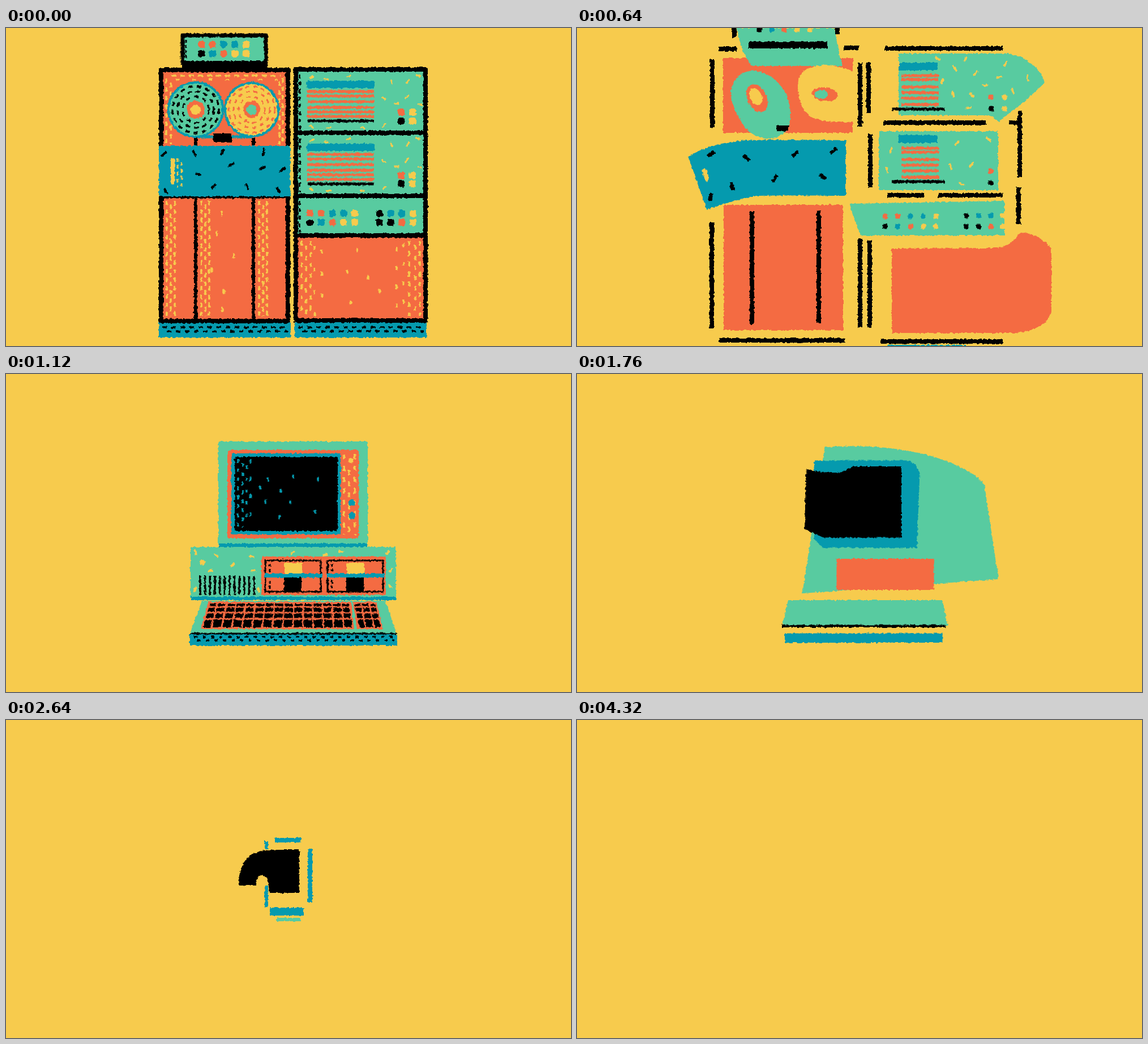
Write an HTML page that moves like this. It is 998 px wide and 561 px high and loops after 4.8 s.

```html
<!DOCTYPE html>
<html lang="en">
<head>
<meta charset="utf-8">
<title>Shrinking computers</title>
<style>
html, body { margin: 0; width: 100%; height: 100%; overflow: hidden; background: #f7cb4d; }
svg { display: block; width: 100vw; height: 100vh; }
</style>
</head>
<body>
<svg viewBox="0 0 998 561" preserveAspectRatio="none">
  <filter id="rough" filterUnits="userSpaceOnUse" x="0" y="0" width="998" height="561" color-interpolation-filters="sRGB">
    <feTurbulence id="noise" type="fractalNoise" baseFrequency=".22" numOctaves="2" seed="3"/>
    <feDisplacementMap in="SourceGraphic" scale="5" xChannelSelector="R" yChannelSelector="G"/>
  </filter>
  <g id="art" filter="url(#rough)"></g>
</svg>
<script>
const LOOP = 4800, STEP = 80;
const Y = '#f7cb4d', O = '#f46b42', G = '#58cba0', B = '#059aae', K = '#000';
const ink = { Y, O, G, B, K };
const NUM = /-?\d+(\.\d+)?/g;
const lerp = (a, b, u) => a + (b - a) * u;

// Basic marks
const rect = (x1, y1, x2, y2, c, r = 1) =>
  `<rect x="${x1}" y="${y1}" width="${x2 - x1}" height="${y2 - y1}" rx="${r}" fill="${c}"/>`;
const frame = (x1, y1, x2, y2, c, w) =>
  `<path d="${box(x1, y1, x2, y2)}" fill="${c}" stroke="#000" stroke-width="${w}" stroke-linejoin="round"/>`;
const line = (x1, y1, x2, y2, c, w, gaps = '') =>
  `<path d="M${x1} ${y1}L${x2} ${y2}" stroke="${c}" stroke-width="${w}" stroke-dasharray="${gaps}"/>`;
const disc = (x, y, r, c) => `<circle cx="${x}" cy="${y}" r="${r}" fill="${c}"/>`;
const ring = (x, y, r, c, w, gaps = '') =>
  `<circle cx="${x}" cy="${y}" r="${r}" fill="none" stroke="${c}" stroke-width="${w}" stroke-dasharray="${gaps}"/>`;
const shape = (d, c) => `<path d="${d}" fill="${c}"/>`;
const rep = (n, f) => Array.from({ length: n }, (_, i) => f(i)).join('');
const dots = (x, y, colors, gap = 19.7, s = 12) => [...colors].map((c, i) =>
  rect(x + i * gap - s / 2, y - s / 2, x + i * gap + s / 2, y + s / 2, ink[c], s / 3)).join('');
// Short strokes from a flat list of x, y, angle
const marks = (list, c, len = 9, w = 3.5) => rep(list.length / 3, i => {
  const [x, y, a] = list.slice(i * 3, i * 3 + 3);
  return `<rect x="${-len / 2}" y="${-w / 2}" width="${len}" height="${w}" rx="1" fill="${c}" transform="translate(${x} ${y}) rotate(${a})"/>`;
});
const cols = (xs, y1, y2, c, w = 3.5, gaps = '8 7') =>
  xs.map((x, i) => line(x, y1 + i % 2 * 7, x, y2, c, w, gaps)).join('');

// Outlines
const box = (x1, y1, x2, y2) => `M${x1} ${y1}L${x2} ${y1}L${x2} ${y2}L${x1} ${y2}Z`;
const bar = (x1, y1, x2, y2, w) => x1 === x2
  ? box(x1 - w / 2, y1, x1 + w / 2, y2) : box(x1, y1 - w / 2, x2, y1 + w / 2);
const oval = (x, y, rx, ry, deg) => {
  const t = deg * Math.PI / 180;
  return 'M' + Array.from({ length: 24 }, (_, i) => {
    const a = i * Math.PI / 12, p = rx * Math.cos(a), q = ry * Math.sin(a);
    return (x + p * Math.cos(t) - q * Math.sin(t)).toFixed(1) + ' ' + (y + p * Math.sin(t) + q * Math.cos(t)).toFixed(1);
  }).join('L') + 'Z';
};

// A key is an outline, or [x, y] where the piece collapses to a point
function mix(a, b, u) {
  const to = Array.isArray(b) ? null : b.match(NUM);
  let i = 0;
  return a.replace(NUM, v => {
    const end = to ? +to[i] : b[i % 2];
    i++;
    return lerp(+v, end, u).toFixed(1);
  });
}
function morph(pieces, times, t) {
  let i = 0;
  while (i < times.length - 2 && times[i + 1] <= t) i++;
  const u = (t - times[i]) / (times[i + 1] - times[i]);
  return pieces.map(([c, ...keys]) => {
    const a = keys[i], b = keys[i + 1];
    if (!a || (u && !b)) return '';
    return shape(u ? mix(a, b, u) : a, c);
  }).join('');
}

function terminal(dy) {
  return rect(531, 93 + dy, 651, 106 + dy, B, 4) +
    [112, 120, 130, 140, 148, 156].map(y => line(532, y + dy, 650, y + dy, O, 5)).join('') +
    line(533, 164 + dy, 650, 164 + dy, K, 5) +
    dots(698, 149 + dy, 'OY', 20) + dots(698, 164 + dy, 'KY', 20) +
    marks([540,87,-30, 566,90,10, 605,85,-20, 681,95,65, 710,94,-60, 728,84,20, 667,124,30, 708,122,-40, 690,133,0,
      731,135,20, 668,171,-50, 570,176,-15, 630,176,10, 540,174,40].map((v, i) => i % 3 === 1 ? v + dy : v), Y, 9, 3);
}

function mainframe() {
  const base = x => rect(x, 519, x + 233, 546, B) +
    line(x + 6, 528, x + 228, 528, K, 3.5, '8 8') + line(x + 14, 535, x + 228, 535, K, 3.5, '8 8');
  return base(270) + base(510) +
    frame(312, 13, 459, 62, G, 7) + rect(310, 58, 462, 72, K) +
    dots(345, 29, 'OOBBY') + dots(345, 45, 'KBOYY') + line(318, 21, 318, 55, K, 3, '5 4') +
    frame(274, 74, 498, 517, O, 8) +
    line(291, 84, 484, 84, Y, 3.5, '9 7') + line(300, 91, 480, 91, Y, 3, '7 22') +
    cols([283, 291], 90, 205, Y) + cols([489, 483], 88, 205, Y) +
    line(335, 192, 434, 192, B, 5) +
    line(335, 194, 335, 516, K, 6) + line(437, 194, 437, 516, K, 6) +
    disc(335, 144, 47, G) + ring(335, 144, 48, B, 4) +
    [23, 32, 41].map(r => ring(335, 144, r, K, 3.5, '8 7')).join('') +
    disc(335, 144, 16, O) + disc(335, 144, 9, Y) +
    disc(434, 144, 47, Y) + ring(434, 144, 47, B, 4) +
    [23, 32, 41].map(r => ring(434, 144, r, O, 3, '7 7')).join('') +
    disc(434, 144, 15, O) + disc(434, 144, 9, G) +
    rect(366, 186, 399, 202, K, 2) +
    line(272, 298, 500, 298, K, 5) + rect(270, 208, 502, 297, B) +
    marks([279,222,-45, 333,221,55, 382,219,-65, 455,219,-85, 398,241,-25, 453,247,-25, 488,250,-35,
      339,258,20, 367,279,-45, 426,280,65, 481,286,60, 282,288,55], K, 12, 4) +
    rect(291, 229, 298, 276, Y, 3) + cols([303, 310], 230, 281, Y, 3, '6 6') +
    cols([284, 291, 298], 305, 508, Y) + cols([345, 352, 359], 305, 508, Y) + cols([447, 454, 461], 305, 508, Y) +
    marks([381,327,90, 372,363,90, 402,401,90, 363,427,90, 385,465,90, 382,497,90], Y) +
    frame(512, 73, 741, 366, G, 8) + frame(512, 366, 741, 516, O, 8) +
    line(510, 185, 743, 185, K, 8) + line(510, 296, 743, 296, K, 8) +
    [[82, 180], [195, 290], [305, 360]].map(([a, b]) => line(519, a, 519, b, K, 3.5, '7 6')).join('') +
    terminal(0) + terminal(111) +
    dots(537, 327, 'OOBBY') + dots(537, 343, 'KBOYY') + dots(660, 327, 'KBBY') + dots(660, 343, 'KKOY') +
    cols([522, 530, 538], 376, 508, Y, 3.5, '8 11') + cols([545, 558], 384, 508, Y, 3, '7 32') +
    cols([731, 723, 712], 376, 508, Y, 3.5, '8 10') + cols([702, 690], 380, 508, Y, 3, '7 26') +
    marks([603,430,90, 640,440,90, 620,391,90, 660,464,90, 609,484,90], Y, 7);
}

function desktop() {
  const drive = x => frame(x, 329, x + 98, 384, O, 3) +
    cols([x + 8], 335, 350, K, 3, '5 4') + cols([x + 8], 364, 379, K, 3, '5 4') +
    rect(x + 34, 333, x + 65, 354, Y) + rect(x + 33, 357, x + 64, 383, K) + rect(x - 2, 352, x + 101, 359, B);
  const keys = (a, b, c, d, n) => shape(`M${a} 402L${b} 402L${d} 450L${c} 450Z`, O) +
    shape(`M${a + 3} 405L${b - 3} 405L${d - 4} 447L${c + 4} 447Z`, K) +
    rep(n - 1, i => line(lerp(a, b, (i + 1) / n), 403, lerp(c, d, (i + 1) / n), 449, O, 3)) +
    [411, 421, 432].map(y => line(lerp(a, c, (y - 402) / 48), y, lerp(b, d, (y - 402) / 48), y, O, 3)).join('');
  return rect(375, 119, 639, 302, G, 3) + rect(376, 299, 638, 306, B) +
    rect(391, 134, 623, 290, O, 3) + rect(398, 140, 591, 283, B, 2) + rect(404, 146, 586, 277, K, 3) +
    cols([410, 418], 150, 270, B, 3.5, '7 9') + cols([425], 162, 262, B, 3, '6 15') + cols([432], 150, 264, B, 3, '8 23') +
    marks([463,186,90, 507,181,90, 551,186,90, 449,200,90, 485,206,90, 458,225,90, 502,226,90, 546,243,90, 483,252,90], B, 7, 3.5) +
    cols([597, 606, 616], 142, 284, Y, 3.5, '9 11') +
    disc(609, 153, 7, O) + disc(609, 153, 5, Y) + disc(611, 227, 6, B) + disc(611, 250, 6, B) +
    rect(326, 305, 689, 395, G) + rect(327, 393, 689, 399, B) + disc(347, 332, 5, Y) +
    marks([371,320,25, 400,337,-35, 361,347,-10, 434,322,20, 436,347,-15, 334,380,-60, 335,315,80, 446,381,70,
      506,315,-35, 564,319,-20, 592,313,10, 674,315,-40, 680,346,-60, 678,374,55], Y, 9, 4) +
    rep(12, i => line(343 + i * 8.65, 356, 343 + i * 8.65, 390, K, 3.5)) +
    rect(451, 322, 671, 390, O, 3) + drive(458) + drive(568) +
    shape('M346 400L670 400L690 458L325 458Z', G) + keys(357, 609, 344, 615, 15) + keys(613, 655, 620, 666, 3) +
    rect(324, 459, 691, 479, B) + line(325, 458, 690, 458, K, 3) +
    line(332, 464, 686, 464, K, 3.5, '6 9') + line(338, 470, 686, 470, K, 3.5, '6 9');
}

const phone = () => rect(453, 340, 547, 358, G, 6) + rect(453, 201, 547, 350, B, 8) + rect(463, 214, 537, 326, K, 3) +
  cols([470, 477], 220, 320, B, 3, '6 9') +
  marks([500,238,90, 520,256,90, 495,275,90, 523,297,90], B, 6, 3) + disc(500, 338, 5, O);

const MELT = [640, 880, 1120];
const meltPieces = [
  [O, box(258, 53, 487, 185), 'M316 70L384 145L340 158L317 162Z', [391, 200]],
  [G, 'M283 0L455 0C458 20 462 40 464 50C466 58 469 62 470 67L390 67L310 67C296 55 285 20 283 0Z',
    'M295 32L462 32C480 70 520 85 570 122C600 145 632 160 632 177L570 208L445 208C430 200 400 160 384 147C335 105 312 75 295 32Z',
    'M375 119L560 119C600 119 639 119 639 150C639 200 639 280 639 302L500 302L375 302C375 250 375 200 375 119Z'],
  [G, 'M568 45L760 45C790 48 812 68 820 82C824 88 825 93 826 97L790 130L745 165L738 160C736 158 732 155 725 154L568 154Z',
    'M681 47L750 47C805 52 833 105 833 165C833 235 790 275 735 276L634 276L634 179L733 180C740 172 740 152 728 150L681 150Z',
    'M326 305L660 305C675 305 689 305 689 320C689 350 689 390 680 394L600 394L500 394L400 394C380 394 340 394 326 394L326 340Z'],
  [G, box(533, 182, 744, 286), box(634, 181, 736, 275)],
  [G, 'M272 110C278 75 315 65 345 88C365 102 376 125 377 150C377 170 372 185 358 190L350 194C325 200 300 185 290 165C278 145 270 125 272 110Z',
    'M328 165C335 140 370 130 385 152C410 185 430 215 470 235C490 244 515 245 533 247L533 253C490 256 450 248 430 235C390 215 345 195 328 165Z', [440, 280]],
  [O, oval(318, 124, 17, 26, -25), oval(375, 181, 8, 36, -45), [410, 220]],
  [Y, oval(316, 121, 10, 16, -25), oval(363, 169, 3.5, 6, -40)],
  [K, box(352, 172, 374, 182), box(571, 180, 634, 276), box(404, 146, 586, 277)],
  [Y, 'M390 100C392 75 410 64 445 66C465 68 480 72 492 80L492 164C470 168 440 166 420 160C400 152 390 130 390 100Z',
    'M451 115C455 92 490 90 525 118C560 140 590 165 606 188L603 199C580 185 545 175 500 155C470 140 448 135 451 115Z', [600, 200]],
  [O, oval(438, 117, 23, 12, 5), oval(498, 128, 34, 8, 22), [607, 200]],
  [G, oval(431, 117, 12, 8, 0), oval(484, 124, 7, 5, 10)],
  [O, box(259, 312, 470, 533), box(320, 327, 432, 474), 'M357 402L655 402L666 450L344 450Z'],
  [O, 'M556 389L742 388C765 385 775 372 783 360C808 362 828 375 838 390L838 500C835 522 800 538 770 538L640 538L580 538L556 538Z',
    'M491 321L785 321C792 321 798 321 802 323C820 328 834 338 834 350L834 487C828 500 810 515 795 515L690 515L690 404L491 404Z',
    'M452 322L620 322C640 322 655 322 660 322C668 322 671 324 671 328L671 380C671 386 668 390 660 390L560 390L500 390L452 390Z'],
  [G, 'M482 310L755 305L755 325L755 340L755 355L755 366L640 366L502 366C495 352 486 330 482 310Z',
    'M500 299L603 299L603 321L491 321L491 348L560 348L560 396L430 397C400 385 400 318 430 313Z',
    'M326 305L452 305L452 325L452 340L452 350L452 360L452 394L326 394C326 370 326 340 326 320Z'],
  [B, 'M475 198C400 197 340 197 300 198C260 200 215 212 197 228L229 320C255 312 290 300 320 296C370 295 430 296 475 296Z',
    'M312 195C210 205 146 260 146 335C146 410 210 470 320 475L320 413C265 410 227 395 227 352C227 320 270 297 312 291Z',
    'M324 460C324 465 324 470 324 478C400 478 500 478 691 478L691 460C600 460 550 460 500 460C450 460 400 460 340 460Z'],
  [G, box(228, 319, 230, 321), box(320, 414, 415, 474), 'M340 400L675 400L690 458L325 458Z'],
  [B, box(548, 559, 688, 580), box(636, 549, 678, 561)],
  [B, box(270, 570, 460, 590), box(364, 549, 400, 561)],
  [O, box(372, 180, 380, 184), box(386, 220, 393, 228)],
  [O, box(573, 261, 640, 266), box(505, 289, 522, 295)],
  [Y, oval(227, 259, 4.5, 12, -15), [240, 290]]
];
// Black bars: start x1 y1 x2 y2, end x1 y1 x2 y2
const keptBars = [
  [303,30,442,30, 368,34,383,34], [544,36,752,36, 632,37,650,37], [239,55,239,176, 247,87,247,93],
  [541,167,722,167, 655,165,675,165], [547,295,613,295, 575,289,581,289], [638,295,753,295, 690,292,697,292],
  [238,343,238,530, 246,380,246,386], [309,324,309,523, 315,411,315,426], [427,322,427,520, 435,437,487,437],
  [500,371,500,528, 500,419,500,433], [517,375,517,528, 519,427,519,434], [251,551,363,551, 310,539,318,539],
  [361,551,473,551, 411,539,419,539], [537,553,645,553, 590,540,598,540], [643,553,752,553, 689,540,697,540]
].map(b => [K, bar(...b.slice(0, 4), b[1] === 30 ? 12 : 8), bar(...b.slice(4), 7), [(b[4] + b[6]) / 2, (b[5] + b[7]) / 2]]);
const fading = (c, w, list) => list.map(b => [c, bar(...b, w), [(b[0] + b[2]) / 2, (b[1] + b[3]) / 2]]);
const lostBars = fading(K, 8, [
  [278,-20,278,17], [460,-20,460,11], [250,37,282,37], [471,35,498,35], [500,62,500,174], [515,61,515,150],
  [763,167,785,167], [782,146,782,263], [518,187,518,281], [780,281,780,346]]);
const panelBars = [0, 128].flatMap(dy => [
  ...fading(B, 14, [[568, 68 + dy, 637, 68 + dy]]),
  ...fading(O, 5, [84, 91, 104, 114, 124, 135].map(y => [573, y + dy, 639, y + dy])),
  ...fading(K, 5, [[556, 143 + dy, 650, 143 + dy]])]);

const bandMarks = [
  [237,222,-35, 299,229,40, 385,222,-35, 453,217,-40, 274,279,80, 349,266,-60, 434,262,35, 236,298,-75, 274,279,80, 236,298,-75, 237,222,-35],
  [224,244,-5, 272,222,30, 280,263,-85, 300,286,-55, 228,290,75, 214,338,-45, 258,431,-15, 196,410,85, 172,366,25, 299,456,-70, 178,290,-40]];
const archMarks = [
  [637,54,30, 667,71,60, 686,55,-60, 645,94,-70, 704,80,-45, 721,101,0, 757,63,-60, 745,87,-15, 796,88,80, 664,117,80, 770,112,75,
    692,141,-5, 671,203,-50, 660,244,70, 697,241,-45, 547,250,75, 727,196,30, 680,275,20, 555,215,-70, 697,118,45],
  [714,70,-75, 743,72,-65, 770,95,0, 701,121,90, 742,117,0, 752,150,80, 802,93,50, 800,121,15, 796,149,-45, 786,184,0, 799,217,-60,
    751,202,0, 678,201,-45, 730,229,-30, 754,243,-70, 663,245,80, 710,262,0, 710,262,0, 663,245,80, 742,117,0]];
const mixList = ([a, b], u) => a.map((v, i) => lerp(v, b[i], u));

function melt(t) {
  const u = (t - 640) / 240, s = 9 * (1 - u);
  let out = morph([...meltPieces, ...keptBars, ...lostBars, ...panelBars], MELT, t);
  if (u <= 1) out += marks(mixList(bandMarks, u), K, 14, 6) + marks(mixList(archMarks, u), Y, 11, 3.5);
  if (u < 1) out += dots(731, 122, 'OY', 24, s) + dots(732, 142, 'KY', 23, s) + dots(731, 253, 'O', 0, s) + dots(731, 273, 'K', 0, s) +
    dots(544, 332, 'OOBBY', 22.5, s) + dots(544, 350, 'KBOYY', 22.5, s) + dots(688, 331, 'KBBY', 21.5, s) +
    dots(688, 350, 'KKOY', 21.5, s) + dots(322, 3, 'KBOYY', 22.3, s);
  return out;
}

const FOLD = [1680, 1840, 2000, 2160];
const foldPieces = [
  [G, 'M375 119C460 119 550 119 639 119L689 394L326 394Z', 'M500 140C640 120 800 170 800 270L800 330L470 380Z',
    'M574 237C600 275 640 300 694 318L694 362L574 366Z', [545, 350]],
  [B, 'M398 140L580 140C585 140 590 143 591 150L591 283L430 283L398 283L398 270Z',
    'M440 165L590 165C605 170 615 185 620 200L610 330L440 330L440 300L440 280Z',
    'M476 211L540 211C555 213 565 225 574 237L574 366L461 366L461 322L476 322Z',
    'M453 201L537 201C543 201 547 205 547 211L547 350L453 350L453 300L453 280Z'],
  [K, 'M404 146C420 146 440 146 460 146L500 146L586 146L586 277L440 277L404 277Z',
    'M405 190C425 200 460 205 475 200L475 180L560 180L560 300L430 300L400 270Z',
    'M427 249C450 262 480 264 490 257L490 234L532 234L532 322L440 322L405 308Z',
    'M463 214C468 214 472 214 480 214L490 214L537 214L537 326L480 326L463 326Z'],
  [O, box(452, 322, 671, 390), box(465, 330, 590, 372), box(475, 336, 529, 355), [500, 339]],
  [G, 'M346 400L670 400L690 458L325 458Z', box(400, 398, 620, 430), box(456, 396, 547, 415), box(453, 350, 547, 358)],
  [B, box(324, 460, 691, 478), box(410, 455, 600, 470), box(479, 452, 528, 462), [500, 420]],
  [K, box(324, 457, 691, 460), box(400, 428, 610, 434), box(464, 416, 532, 421), [500, 400]],
  [G, '', '', box(489, 361, 514, 367), [500, 355]],
  [O, '', box(610, 170, 618, 210), box(593, 205, 599, 223), [590, 215]]
];

const shrinkPieces = [
  ...fading(B, 6, [[460, 214, 460, 227], [460, 292, 460, 330]]),
  ...fading(B, 8, [[475, 212, 521, 212], [537, 227, 537, 322]]),
  ...fading(B, 14, [[466, 338, 526, 338]]),
  ...fading(G, 6, [[478, 352, 521, 352]]),
  [K, 'M411 290C411 255 425 232 465 229L518 229L518 305L466 305C463 290 463 275 453 274C445 274 442 280 442 292L411 292Z',
    'M489 281C489 273 494 270 500 270L508 272L511 281L506 290C503 291 500 291 497 291C494 291 492 290 491 288L489 284Z']
];

function burst(t) {
  const u = (t - 3920) / 400, near = lerp(13, 34, u), far = lerp(20, 38, Math.sqrt(u));
  return (u < .3 ? disc(500, 281, 10 * (1 - u * 3), K) : '') + rep(8, i => {
    const x = Math.cos(i * Math.PI / 4), y = Math.sin(i * Math.PI / 4) * .88;
    return line(501 + near * x, 281 + near * y, 501 + far * x, 281 + far * y, K, 3.5);
  });
}

function scene(t) {
  if (t < 80) return mainframe();
  if (t < 640) return `<g transform="translate(-92 -51) scale(1.185)">${mainframe()}</g>`;
  if (t < 1120) return melt(t);
  if (t < 1760) return desktop();
  if (t < 2160) return morph(foldPieces, FOLD, t);
  if (t < 2640) return phone();
  if (t < 2960) return morph(shrinkPieces, [2640, 2960], t);
  if (t < 3920) return disc(500, 281, 10.5, K);
  return t < 4320 ? burst(t) : '';
}

const art = document.getElementById('art'), noise = document.getElementById('noise');
let shown = -1;
function draw(ms) {
  const t = Math.floor(ms % LOOP / STEP) * STEP;
  if (t !== shown) {
    shown = t;
    // The small dot wobbles while it rests
    noise.setAttribute('seed', t >= 2960 && t < 3920 ? Math.floor((t - 2960) / 160) + 3 : 3);
    art.innerHTML = scene(t);
  }
}
const start = performance.now();
function tick() {
  draw(performance.now() - start);
  requestAnimationFrame(tick);
}
tick();
</script>
</body>
</html>
```
